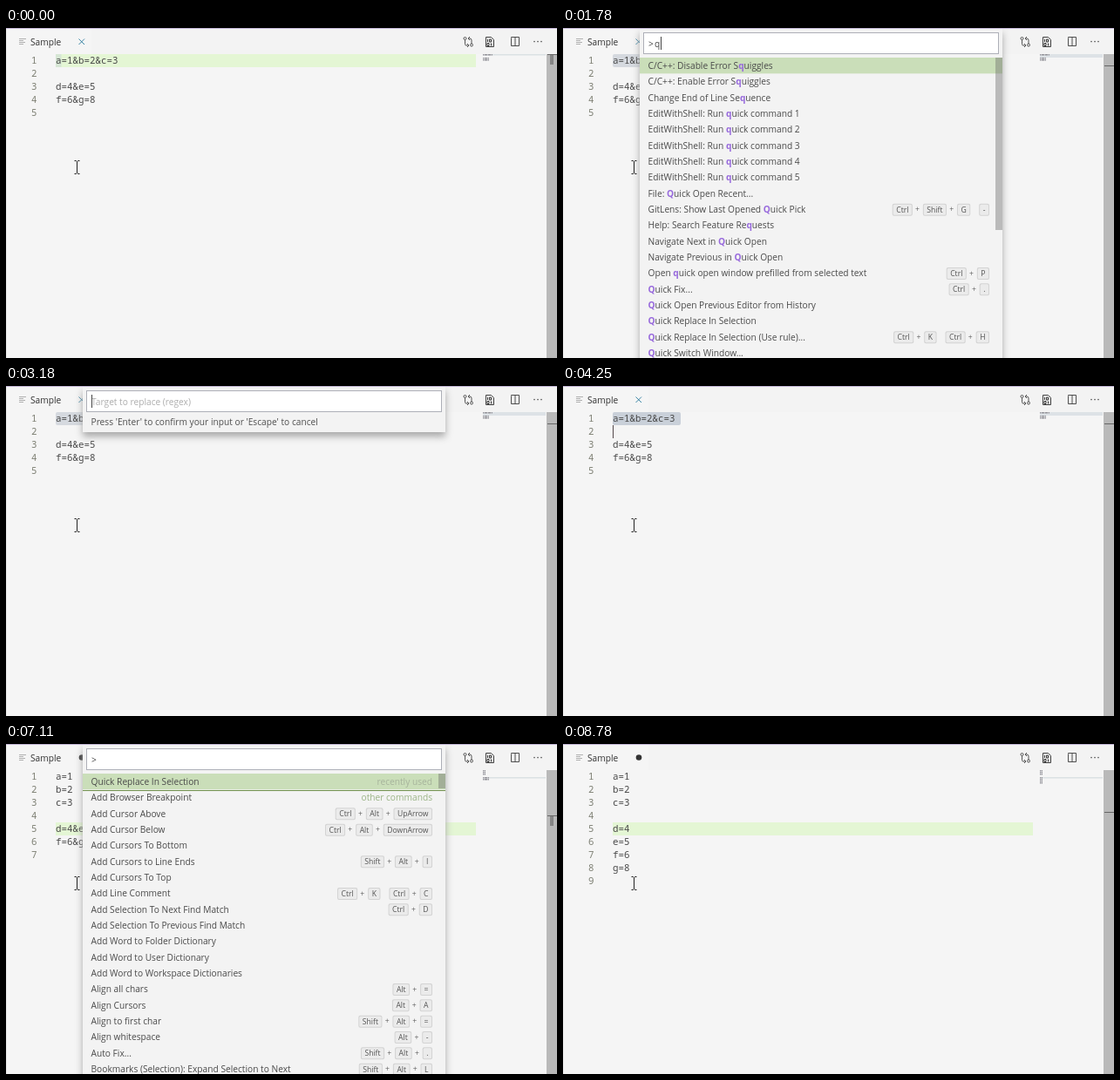
Recreate the animation shown at these times as an HTML page with a canvas. Size 632 px wide and 379 px high, loop 9160 ms.

```html
<!DOCTYPE html>
<html lang="en">
<head>
<meta charset="utf-8">
<title>Quick replace in selection</title>
<style>
  html, body { margin: 0; width: 632px; height: 379px; overflow: hidden; background: #f5f5f5; }
  canvas { display: block; }
</style>
</head>
<body>
<canvas width="632" height="379"></canvas>
<script>
const ctx = document.querySelector('canvas').getContext('2d');
const LOOP = 9160, TOP = 30, LINE = 15, CHAR = 6.5, ROW = 18.33;
const UI = '"Open Sans", "Noto Sans", sans-serif';
const MONO = '10.83px "Noto Sans Mono", monospace';
const LABEL = '10.2px ' + UI, BOLD = 'bold ' + LABEL, KEY = '8.6px ' + UI;

const recent = 'Quick Replace In Selection';
const allCommands = [
  'Add Browser Breakpoint', 'Add Cursor Above|Ctrl+Alt+UpArrow', 'Add Cursor Below|Ctrl+Alt+DownArrow',
  'Add Cursors To Bottom', 'Add Cursors to Line Ends|Shift+Alt+I', 'Add Cursors To Top',
  'Add Line Comment|Ctrl+K Ctrl+C', 'Add Selection To Next Find Match|Ctrl+D',
  'Add Selection To Previous Find Match', 'Add Word to Folder Dictionary', 'Add Word to User Dictionary',
  'Add Word to Workspace Dictionaries', 'Align all chars|Alt+=', 'Align Cursors|Alt+A',
  'Align to first char|Shift+Alt+=', 'Align whitespace|Alt+-', 'Auto Fix...|Shift+Alt+.',
  'Bookmarks (Selection): Expand Selection to Next|Shift+Alt+L',
  'Bookmarks (Selection): Expand Selection to Previous|Shift+Alt+J'
];
const useRule = 'Quick Replace In Selection (Use rule)...|Ctrl+K Ctrl+H';
const openRecent = 'File: Quick Open Recent...';
const qCommands = [
  'C/C++: Disable Error Squiggles', 'C/C++: Enable Error Squiggles', 'Change End of Line Sequence',
  ...[1, 2, 3, 4, 5].map(n => 'EditWithShell: Run quick command ' + n),
  openRecent, 'GitLens: Show Last Opened Quick Pick|Ctrl+Shift+G -', 'Help: Search Feature Requests',
  'Navigate Next in Quick Open', 'Navigate Previous in Quick Open',
  'Open quick open window prefilled from selected text|Ctrl+P', 'Quick Fix...|Ctrl+.',
  'Quick Open Previous Editor from History', recent, useRule, 'Quick Switch Window...'
];
const qrCommands = [openRecent, recent, useRule, ...['Least', 'Previous'].flatMap(which =>
  ['', ' in Group'].map(end => `View: Quick Open ${which} Recently Used Editor${end}`))];

const palette = (items, query = '', more = {}) =>
  ({ items, query, prefix: '>', caret: true, active: 0, thumb: 0, thumbAlpha: 1, ...more });
const prompt = (query, hint, more = {}) => ({ query, hint, prefix: '', caret: true, ...more });
const target = 'Target to replace (regex)', replacement = 'Replace to';
const firstList = palette(allCommands, '', { thumb: 17 });
const secondList = palette([recent, ...allCommands], '', { thumb: 17, grouped: true });

const before = ['a=1&b=2&c=3', '', 'd=4&e=5', 'f=6&g=8', ''];
const between = ['a=1', 'b=2', 'c=3', '', ...before.slice(2)];
const after = [...between.slice(0, 4), 'd=4', 'e=5', 'f=6', 'g=8', ''];

// Each entry changes part of the state from its time on.
const timeline = [
  [0, { lines: before, row: 0, selected: false, caret: false, dirty: false, mark: true, panel: null }],
  [150, { caret: true }],
  [530, { row: 1, selected: true, mark: false }],
  [1010, { caret: false }],
  [1240, { panel: palette([]) }],
  [1320, { panel: firstList }],
  [1780, { panel: palette(qCommands, 'q', { thumb: 198 }) }],
  [1860, { panel: palette(qrCommands, 'qr') }],
  [2390, { panel: palette(qrCommands, 'qr', { caret: false }) }],
  [2700, { panel: palette(qrCommands, 'qr', { caret: false, active: 1 }) }],
  [2870, { panel: palette(qrCommands, 'qr', { active: 1 }) }],
  [3180, { panel: prompt('', target) }],
  [3710, { panel: prompt('&', target) }],
  [4250, { panel: null, caret: true }],
  [4350, { panel: prompt('', replacement) }],
  [4790, { panel: prompt('\\', replacement) }],
  [4960, { panel: prompt('\\n', replacement) }],
  [5260, { panel: null }],
  [5340, { lines: between, row: 3, dirty: true }],
  [5800, { caret: false }],
  [6030, { row: 4, selected: false, caret: true, mark: true }],
  [6500, { panel: palette([]) }],
  [6580, { panel: { ...secondList, thumbAlpha: .5 } }],
  [6810, { panel: secondList }],
  [7110, { panel: { ...secondList, caret: false } }],
  [7190, { panel: null }],
  [7270, { panel: prompt('&', target, { selected: true }) }],
  [7740, { panel: null }],
  [7820, { panel: prompt('\\n', replacement, { selected: true }) }],
  [8380, { lines: after, panel: null, mark: false }],
  [8780, { caret: false }]
];

function rect(x, y, w, h, color) {
  ctx.fillStyle = color;
  ctx.fillRect(x, y, w, h);
}

function text(string, x, y, color, font = LABEL) {
  ctx.font = font;
  ctx.fillStyle = color;
  ctx.fillText(string, x, y);
  return x + ctx.measureText(string).width;
}

function textRight(string, x, y, color) {
  ctx.font = LABEL;
  text(string, x - ctx.measureText(string).width, y, color);
}

function stroke(path, color, width = 1) {
  ctx.strokeStyle = color;
  ctx.lineWidth = width;
  ctx.stroke(new Path2D(path));
}

function dot(x, y, r, color) {
  ctx.fillStyle = color;
  ctx.beginPath();
  ctx.arc(x, y, r, 0, 7);
  ctx.fill();
}

function rounded(x, y, w, h, r, color) {
  ctx.fillStyle = color;
  ctx.beginPath();
  ctx.roundRect(x, y, w, h, r);
  ctx.fill();
}

function drawTabs(dirty) {
  rect(0, 0, 632, TOP, '#f3f3f3');
  rect(0, 0, 98, TOP, '#f5f5f5');
  rect(0, 0, 632, 1, '#c4b7d7');
  stroke('M15 12.5h8M15 14.5h5M15 16.5h7M15 18.5h5', '#b0b0b0');
  text('Sample', 28, 20, '#333');
  if (dirty) dot(87, 15.5, 3.3, '#333');
  else stroke('M83.5 12.5l6.5 6.5m0-6.5l-6.5 6.5', '#3f87a6');

  stroke('M526.5 13.5v5q0 1.5 1.5 1.5h3m-2-2l2 2-2 2M534 18v-4q0-2-2-2h-2m2-2l-2 2 2 2' +
    'M525 12a1.5 1.5 0 1 0 3 0a1.5 1.5 0 1 0-3 0M532.5 19.5a1.5 1.5 0 1 0 3 0a1.5 1.5 0 1 0-3 0', '#555');
  stroke('M550.5 10.5h6l3 3v8h-9z', '#424242');
  stroke('M552.5 13v3m2-3h2v3h-2zM552 17.5h2v3h-2zm4.5 0v3', '#333');
  stroke('M579.5 11.5v-1h9v10h-9zM584 10.5v10', '#4d4d4d');
  for (const x of [606, 610, 614]) dot(x, 15.5, .85, '#555');
}

function drawEditor({ lines, row, selected, caret, mark, panel }) {
  const caretY = TOP + row * LINE;
  if (selected) {
    for (let i = 0; i < row; i++) {
      const radii = row === 1 ? 2 : i === 0 ? [2, 2, 0, 0] : i === row - 1 ? [0, 0, 2, 2] : 0;
      rounded(57, TOP + i * LINE, (lines[i].length + 1) * CHAR, LINE, radii, panel ? '#d5d9df' : '#c9d0d9');
    }
  } else {
    rect(57, caretY, 482, LINE, '#e4f6d4');
    if (row === 0) rect(57, caretY, CHAR, LINE, '#d6e6d4');
  }
  lines.forEach((line, i) => {
    const y = TOP + 11 + i * LINE;
    text(i + 1, 29, y, '#7d7f73', MONO);
    text(line, 57, y, '#484848', MONO);
  });
  if (caret && !panel) rect(57, caretY, 1, LINE, '#54494b');

  if (selected) rect(547, TOP, 72, (row + 1) * 2, '#dde2e6');
  else rect(547, TOP + row * 2, 72, 1.5, '#dbe1e4');
  lines.forEach((line, i) => {
    for (let c = 0; c < line.length; c++) {
      rect(547 + c, TOP + i * 2, 1, 1.5, line[c] === '=' ? '#c4c4c8' : '#94949a');
    }
  });

  const rulerY = TOP + row * (lines.length < 9 ? 13 : 12);
  rect(620, TOP, 12, 349, '#b9b9b9');
  rect(621, rulerY, 11, 1, '#666');
  if (mark) rect(624, rulerY + 1, 4, 11, '#858585');
}

function drawKeys(keys, y) {
  let x = 489;
  const tokens = keys.split(/([+ ])/);
  for (const token of tokens.reverse()) {
    if (token === ' ') { x -= 10; continue; }
    if (token === '+') { text('+', x - 8.8, y + 3.2, '#666', KEY); x -= 12; continue; }
    ctx.font = KEY;
    const w = ctx.measureText(token).width + 9;
    rounded(x - w, y - 6.5, w, 14, 2, '#d3d3d3');
    rounded(x - w + 1, y - 5.5, w - 2, 12, 1.5, '#ebebeb');
    text(token, x - w + 4.5, y + 3.5, '#555', KEY);
    x -= w;
  }
}

function drawLabel(label, query, y) {
  const hits = [];
  if (query) hits.push(label.search(/q/i));
  if (query === 'qr') hits.push(label.search(/\br/i));
  let x = 97.5, start = 0;
  for (const hit of hits) {
    x = text(label.slice(start, hit), x, y, '#4a4a4a');
    x = text(label[hit], x, y, '#9769dc', BOLD);
    start = hit + 1;
  }
  text(label.slice(start), x, y, '#4a4a4a');
}

function drawList({ items, query, active, grouped, thumb, thumbAlpha }) {
  items.forEach((item, i) => {
    const [label, keys] = item.split('|');
    const top = 34 + i * ROW, middle = top + 9.2;
    if (i === active) rect(88, top, 416, ROW, '#cadeb9');
    drawLabel(label, query, middle + 3.7);
    if (keys) drawKeys(keys, middle);
    if (grouped && i < 2) textRight(i ? 'other commands' : 'recently used', 489, middle + 3.7, i ? '#9bb486' : '#a6b39b');
  });
  if (grouped) rect(88, 53, 416, 1, '#749351');
  if (thumb) rect(496, 34, 8, thumb, `rgba(100,100,100,${.4 * thumbAlpha})`);
}

function drawPanel(panel) {
  const { items, query, prefix, hint, caret, selected } = panel;
  const bottom = items ? 34 + items.length * ROW : 53;
  ctx.save();
  ctx.shadowColor = '#a8a8a8';
  ctx.shadowBlur = 8;
  ctx.shadowOffsetY = 5;
  rect(88, 1, 416, bottom - 1, '#f3f3f3');
  ctx.restore();
  rect(92, 5, 408, 25, '#adafb7');
  rect(93, 6, 406, 23, '#fff');

  let x = 98;
  if (prefix) {
    text(prefix, x, 21.5, '#444');
    x = 105;
  }
  ctx.font = LABEL;
  const end = x + ctx.measureText(query).width;
  if (selected) rect(x, 10, end - x, 15, '#c9d0d9');
  if (hint && !query) text(hint, x, 21.5, '#adadad');
  text(query, x, 21.5, '#444');
  if (caret) rect(Math.ceil(end), 10, 1, 15, '#444');

  if (items) drawList(panel);
  else text("Press 'Enter' to confirm your input or 'Escape' to cancel", 97.5, 45, '#4f4f4f');
}

function draw(now) {
  const time = now % LOOP;
  const state = Object.assign({}, ...timeline.filter(([at]) => at <= time).map(([, change]) => change));
  rect(0, 0, 632, 379, '#f5f5f5');
  drawTabs(state.dirty);
  drawEditor(state);
  rect(0, 1, 1, 378, '#e6e6e6');
  if (state.panel) drawPanel(state.panel);
  stroke('M78.5 152.5h2l1 1 1-1h2M78.5 167.5h2l1-1 1 1h2M81.5 153v14', '#222');
  requestAnimationFrame(draw);
}
requestAnimationFrame(draw);
</script>
</body>
</html>
```
